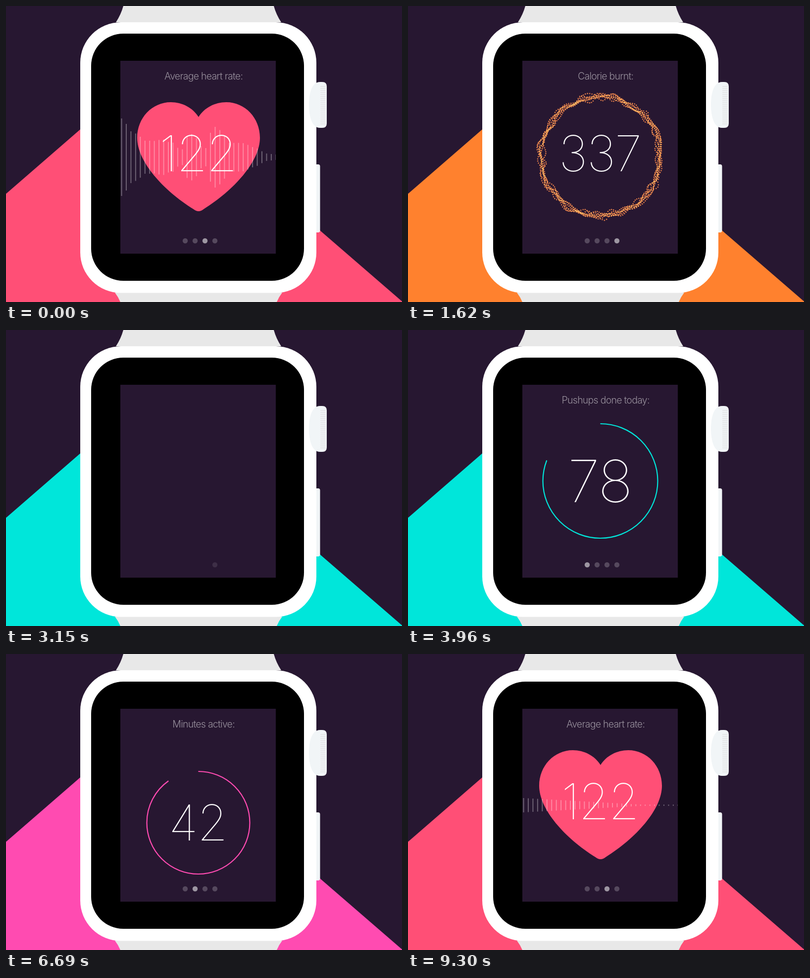
An HTML page with a canvas for the animation above (9330 ms loop, 800 px wide and 600 px high).

```html
<!DOCTYPE html>
<html lang="en">
<head>
<meta charset="utf-8">
<title>Fitness watch</title>
<style>
  html, body { margin: 0; width: 100%; height: 100%; overflow: hidden; background: #271731; }
  canvas { display: block; }
</style>
</head>
<body>
<canvas id="stage" width="800" height="600"></canvas>
<script>
const ctx = document.getElementById('stage').getContext('2d');
const LOOP = 9330, STEP = 30, TAU = Math.PI * 2;
const DARK = '#271731';

const clamp = v => Math.max(0, Math.min(1, v));
const ramp = (v, from, to) => clamp((v - from) / (to - from));
const mix = (a, b, u) => a + (b - a) * u;
const easeOut = u => 1 - (1 - u) ** 2;
const rgb = c => `rgb(${c.map(Math.round)})`;

const pages = [
  { start: 2850, title: 'Pushups done today:', color: [0, 230, 218], fade: 300, draw: pushups },
  { start: 5160, title: 'Minutes active:', color: [255, 75, 177], fade: 300, draw: minutes },
  { start: 7320, title: 'Average heart rate:', color: [255, 79, 118], fade: 375, draw: heartRate },
  { start: 360, title: 'Calorie burnt:', color: [255, 129, 46], fade: 300, draw: calories }
];
pages.forEach((p, i) => {
  const next = pages[(i + 1) % 4].start;
  p.life = (next - p.start + LOOP) % LOOP;
});

const bands = new Path2D('M237 0Q232 18 222 33H556Q546 18 541 0ZM220 581Q227 590 231 600H547Q551 590 558 581Z');
const crown = new Path2D('M634 154H639Q648 154 648 163V238Q648 247 639 247H634C619 247 612 226 612 200S619 154 634 154Z');
// The notch of the heart is the path's zero point.
const heart = new Path2D('M0 0C-12-19-33-30-56-30C-94-30-124 2-124 42C-124 90-72 148-10 187' +
  'Q0 195 10 187C72 148 124 90 124 42C124 2 94-30 56-30C33-30 12-19 0 0Z');

// Bar heights of the pulse, left to right.
const pulse = [157, 135, 105, 96, 83, 67, 67, 66, 70, 72, 62, 59, 38, 32, 84, 94, 77,
  45, 37, 99, 123, 110, 87, 58, 58, 58, 57, 50, 41, 35, 24, 15, 13, 11];

function box(x, y, w, h, r, color) {
  ctx.fillStyle = color;
  ctx.beginPath();
  ctx.roundRect(x, y, w, h, r);
  ctx.fill();
}

function text(str, x, y, font, spacing) {
  ctx.font = font;
  ctx.letterSpacing = spacing + 'px';
  ctx.textAlign = 'center';
  ctx.fillText(str, x + spacing / 2, y);
  ctx.letterSpacing = '0px';
}

function number(value, size, baseline) {
  const font = `100 ${size}px Inter, sans-serif`;
  ctx.font = font;
  ctx.fillStyle = '#fff';
  text(String(Math.floor(value)), 388.5, baseline, font, size * 0.58 - ctx.measureText('8').width);
}

function arc(cy, r, turn, color) {
  ctx.strokeStyle = color;
  ctx.lineWidth = 2.2;
  ctx.beginPath();
  ctx.arc(388.5, cy, r, -TAU / 4, TAU * (turn - 0.25));
  ctx.stroke();
}

function pushups(age, color) {
  const u = easeOut(ramp(age, 480, 1600));
  arc(306, 116, u, color);
  number(mix(40, 87, u), 118, 349);
}

function minutes(age, color) {
  const u = easeOut(ramp(age, 480, 2010));
  arc(342, 104, u, color);
  number(mix(10, 46, u), 100, 378);
}

function outline(scale, alpha, color) {
  ctx.save();
  ctx.translate(389, 225);
  ctx.scale(scale, scale);
  ctx.globalAlpha *= alpha;
  ctx.strokeStyle = color;
  ctx.lineWidth = 2 / scale;
  ctx.stroke(heart);
  ctx.restore();
}

function heartRate(age, color, alpha) {
  const spread = age / 780, fading = 1 - ramp(age, 840, 1700);
  for (let k = 4; k >= 0; k--)
    outline(1.1 ** (k * spread), (0.7 - 0.11 * k) * fading, color);

  ctx.save();
  ctx.globalAlpha = alpha * ramp(age, 840, 1140);
  ctx.translate(389, 225);
  ctx.fillStyle = color;
  ctx.fill(heart);
  ctx.restore();

  number(Math.min(122, 88 + (age - 780) / 32), 100, 334.5);
  ctx.globalAlpha = alpha * 0.32;
  pulse.forEach((_, k) => {
    const h = barHeight(k, age);
    ctx.fillRect(232.5 + k * 9.45, 306.5 - h / 2, 2, h);
  });
}

function barHeight(k, age) {
  if (age < 2010) {
    const grow = ramp(age, 700, 1980);
    return Math.max(2.5, mix(10 - 4 * k, 29 - 1.05 * k, grow));
  }
  const pos = Math.max(0, k - (age - 2010) / 60), i = Math.floor(pos);
  return mix(pulse[i], pulse[Math.min(i + 1, 33)], pos - i);
}

// Wavering strands of dots around the calorie count.
function calories(age, color, alpha) {
  const swell = Math.exp((780 - age) / 500);
  const radius = (119.5 + 3 * swell) * mix(0.8, 1, easeOut(ramp(age, 480, 780)));
  const amp = 5 + 2.5 * swell, drift = age / 600, dots = 184;
  ctx.save();
  ctx.globalCompositeOperation = 'screen';
  ctx.fillStyle = '#dc6e1e';
  for (let j = 0; j < 7; j++) {
    const phase = j * j * 1.9 + drift * (j % 2 ? 1 : -1);
    for (let i = 0; i < dots; i++) {
      const a = (i + j * 0.37) / dots * TAU;
      const wave = Math.sin((5 + j) * a + phase) * (0.7 + 0.5 * Math.sin(2 * a + j * 1.7)) +
        0.7 * Math.sin((13 + j * 2) * a - phase * 1.3) * Math.sin(3 * a + phase);
      const r = radius + amp * wave;
      ctx.beginPath();
      ctx.arc(389 + r * Math.cos(a), 304.5 + r * Math.sin(a), 1.3, 0, TAU);
      ctx.fill();
    }
  }
  ctx.restore();
  number(Math.min(345, 332.01 + (age - 780) / 83), 100, 334.5);
}

function drawPage(page, t) {
  const age = (t - page.start + LOOP) % LOOP, exit = age - page.life;
  if (exit > 320) return;
  const y = exit > 0 ? 149 - 50 * (exit / 170) ** 2
                     : mix(97, 149, easeOut(ramp(age, 450, 950)));
  ctx.globalAlpha = 0.53;
  ctx.fillStyle = '#fff';
  if (y > 98) text(page.title, 399.5, y, '300 19.5px Inter, sans-serif', -0.75);

  const alpha = ramp(age, 480, 480 + page.fade) * (1 - ramp(exit, 150, 290));
  if (!alpha) return;
  ctx.globalAlpha = alpha;
  page.draw(age, rgb(page.color), alpha);
}

function drawDots(t) {
  const resetting = t >= 2850 && t < 3900;
  const away = resetting ? ramp(t, 2850, 3150) * 0.45 + ramp(t, 3150, 3250) * 0.1 : 0;
  const back = resetting ? ramp(t, 3450, 3900) : 0;
  ctx.fillStyle = '#fff';
  pages.forEach((p, i) => {
    const age = (t - p.start + LOOP) % LOOP;
    const on = age < p.life ? ramp(age, 300, 500) : 1 - ramp(age - p.life, 300, 500);
    const base = mix(0.22, 0.55, on);
    ctx.globalAlpha = mix(Math.max(0, base - away), base, back);
    ctx.beginPath();
    ctx.arc(362 + i * 20, 476, 5.2, 0, TAU);
    ctx.fill();
  });
}

function wedgeColor(t) {
  const i = pages.findIndex(p => (t - p.start + LOOP) % LOOP < p.life);
  const age = (t - pages[i].start + LOOP) % LOOP;
  const u = i ? ramp(age, 570, 960) : ramp(age, 0, 270);
  const from = pages[(i + 3) % 4].color;
  return rgb(pages[i].color.map((c, k) => mix(from[k], c, u)));
}

function drawWatch() {
  ctx.fillStyle = '#e8e8e8';
  ctx.fill(bands);
  box(624, 321, 10.5, 138, 4, '#f1f5f7');
  box(150, 33, 477, 548.5, 82, '#fff');
  ctx.fillStyle = '#f1f5f7';
  ctx.fill(crown);
  ctx.fillStyle = '#e5e7e8';
  for (let y = 162; y < 241; y += 4) ctx.fillRect(635, y, 11, 2);
  box(172, 56, 430, 501, 65, '#000');
  ctx.fillStyle = DARK;
  ctx.fillRect(231, 111, 314, 391);
}

function draw(ms) {
  let t = Math.floor(ms % LOOP / STEP) * STEP;
  // Two rests in which the screen stands still.
  if (t > 4530 && t < 5280) t = 4530;
  if (t > 7170 && t < 7320) t = 7170;

  ctx.globalAlpha = 1;
  ctx.fillStyle = DARK;
  ctx.fillRect(0, 0, 800, 600);
  ctx.fillStyle = wedgeColor(t);
  ctx.beginPath();
  [[0, 380.7], [273.9, 142.2], [800, 598.8], [800, 600], [0, 600]].forEach(p => ctx.lineTo(...p));
  ctx.fill();
  drawWatch();

  ctx.save();
  ctx.beginPath();
  ctx.rect(231, 111, 314, 391);
  ctx.clip();
  pages.forEach(p => drawPage(p, t));
  drawDots(t);
  ctx.restore();
}

const begin = performance.now();
function frame() {
  draw(performance.now() - begin);
  requestAnimationFrame(frame);
}
frame();
</script>
</body>
</html>
```
